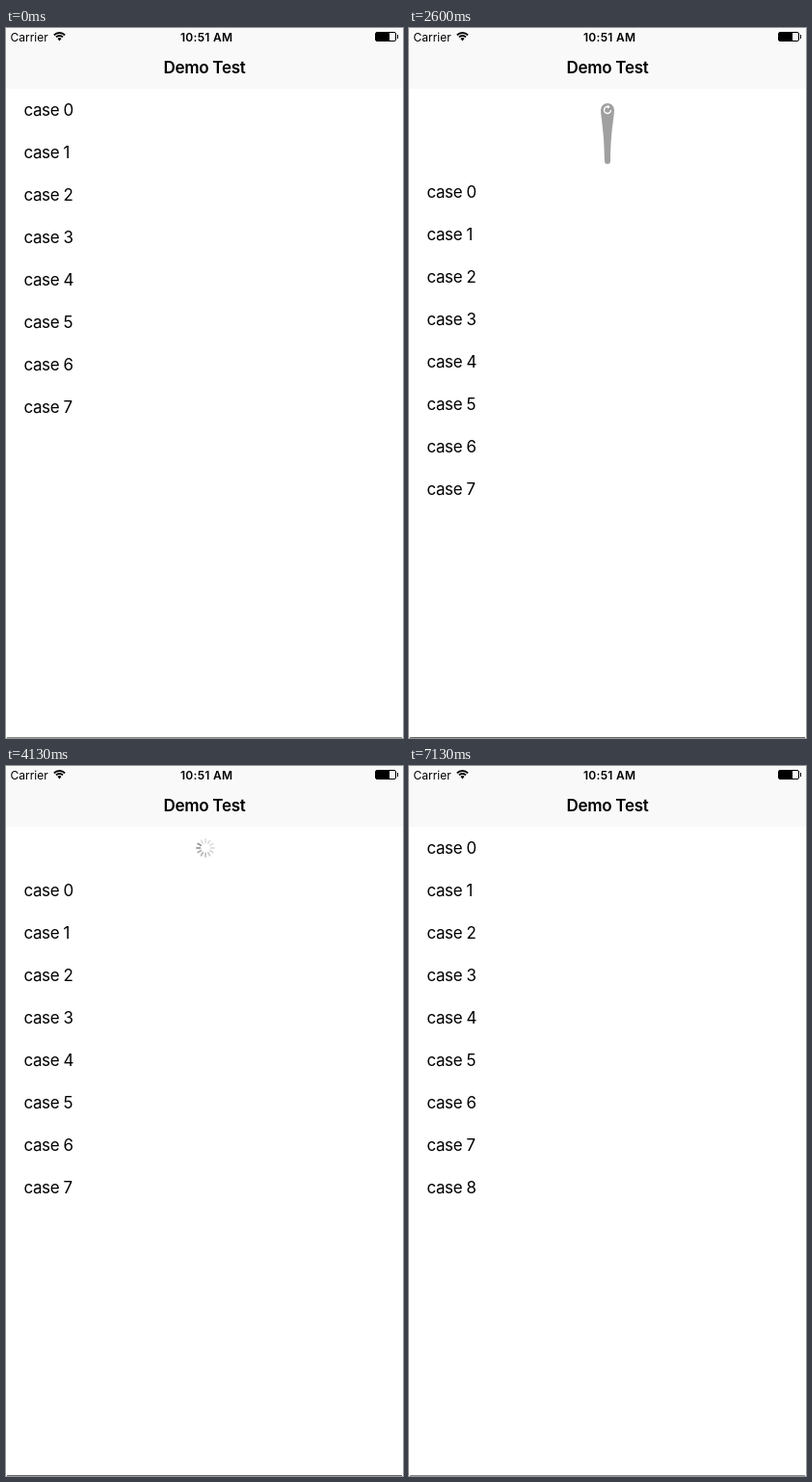
Animation of 412 by 736 pixels, one loop 7340 ms. Source, as an HTML page with a canvas:

```html
<!DOCTYPE html>
<html lang="en">
<head>
<meta charset="utf-8">
<title>Demo Test</title>
<style>
  html, body { margin: 0; width: 100%; height: 100%; overflow: hidden; background: #fff; }
  canvas { display: block; }
</style>
</head>
<body>
<canvas id="stage" width="412" height="736"></canvas>
<script>
const ctx = document.getElementById('stage').getContext('2d');
const LOOP = 7340, STEP = 1000 / 15, TAU = Math.PI * 2;
const BAR = 63, ROW = 44, CX = 206, GRAY = '#a0a0a0';
const TRIGGER = 2800, RELEASE = 3267, DONE = 4860, CLOSE = 5467;

// Time and list offset while the finger drags.
const DRAG = [[1133, 0], [1267, 5], [1467, 18.33], [1733, 37], [1933, 47], [2000, 47],
  [2333, 68], [2600, 85], [2733, 92], [2800, 92], [2867, 102], [3000, 124.33], [RELEASE, 128]];

const clamp = v => Math.max(0, Math.min(1, v));
const lerp = (a, b, p) => a + (b - a) * p;

function dragOffset(t) {
  const i = DRAG.findIndex(point => t <= point[0]);
  if (i < 1) return 0;
  const [t0, a] = DRAG[i - 1], [t1, b] = DRAG[i];
  return lerp(a, b, (t - t0) / (t1 - t0));
}

function offsetAt(t) {
  if (t <= RELEASE) return dragOffset(t);
  if (t <= CLOSE) {
    const u = 10.65 * (t - RELEASE) / 1000;
    return ROW + 84 * (1 + u) * Math.exp(-u);
  }
  return ROW * (1 + Math.cos(Math.PI * clamp((t - CLOSE) / 500))) / 2;
}

function rect(color, x, y, w, h) {
  ctx.fillStyle = color;
  ctx.fillRect(x, y, w, h);
}

function text(string, x, y, font, spacing = 0, color = '#000', align = 'left') {
  ctx.font = font;
  ctx.letterSpacing = spacing + 'px';
  ctx.fillStyle = color;
  ctx.textAlign = align;
  ctx.fillText(string, x, y);
}

function stroke(color, width, path) {
  ctx.strokeStyle = color;
  ctx.lineWidth = width;
  ctx.beginPath();
  path();
  ctx.stroke();
}

function drawPull(offset, t) {
  const gone = clamp((t - TRIGGER) / 133);
  if (offset <= 0 || gone === 1) return;
  const p = clamp((85 - offset) / 47), top = BAR + offset;
  const r = lerp(7, 15.5, p), tail = lerp(3, 15.5, p);
  const y = Math.min(top - 19, lerp(85, 82, p));
  const end = lerp(Math.max(y, top - lerp(7, 3.5, p) - tail), y, gone);
  const near = lerp(r, tail, 0.1), far = lerp(r, tail, 0.9);
  const nearY = lerp(y, end, 0.2), farY = lerp(y, end, 0.4);

  ctx.save();
  ctx.globalAlpha = 1 - gone;
  ctx.fillStyle = GRAY;
  ctx.beginPath();
  ctx.arc(CX, y, r, Math.PI, 0);
  ctx.bezierCurveTo(CX + near, nearY, CX + far, farY, CX + tail, end);
  ctx.arc(CX, end, tail, 0, Math.PI);
  ctx.bezierCurveTo(CX - far, farY, CX - near, nearY, CX - r, y);
  ctx.fill();

  // Reload arrow
  ctx.translate(CX, y);
  ctx.scale(r / 15.5, r / 15.5);
  stroke('#fff', 3, () => ctx.arc(0, 0, 7.7, 0, Math.PI * 1.5));
  ctx.fillStyle = '#fff';
  ctx.beginPath();
  ctx.moveTo(0, -11.5);
  ctx.lineTo(6, -7);
  ctx.lineTo(0, -3);
  ctx.fill();
  ctx.restore();
}

function drawSpinner(t) {
  const size = clamp((t - 3000) / 200);
  if (!size || t >= DONE) return;
  const head = Math.floor(t * 12 / 1000) + 9;
  ctx.save();
  ctx.translate(207, 85);
  ctx.scale(size, size);
  ctx.lineCap = 'round';
  for (let i = 0; i < 12; i++) {
    const age = (head - i) % 12, shade = Math.min(224, 150 + age * 11);
    const a = i * TAU / 12, x = Math.sin(a), y = -Math.cos(a);
    stroke(`rgb(${shade},${shade},${shade})`, 1.8, () => {
      ctx.moveTo(x * 5.5, y * 5.5);
      ctx.lineTo(x * 9, y * 9);
    });
  }
  ctx.restore();
}

function drawMessage(t) {
  if (t < DONE || t > 6000) return;
  ctx.save();
  ctx.globalAlpha = clamp((t - 4800) / 400) * (1 - clamp((t - CLOSE) / 400));
  stroke('#8c8c8c', 1.3, () => ctx.arc(160.5, 85, 9.4, 0, TAU));
  stroke('#8c8c8c', 2, () => {
    ctx.moveTo(156, 85);
    ctx.lineTo(159.3, 88.2);
    ctx.lineTo(165.5, 82);
  });
  text('刷新成功', 205, 90, '14px "Noto Sans CJK SC", "Noto Sans CJK", sans-serif', 0, '#aaa');
  ctx.restore();
}

function drawList(offset, t) {
  const thirds = Math.round(offset * 3), shift = Math.floor(thirds / 3);
  const count = t < DONE ? 8 : 9;
  rect('#fff', 0, BAR + shift, 412, 736);
  for (let i = 0; i < count; i++) {
    text('case ' + i, 18.6, 91 + shift + i * ROW, '17px Inter, sans-serif', -0.45);
  }
  // Hairlines are a third of a pixel high and show only at one subpixel phase.
  if (thirds % 3 !== 1) return;
  for (let y = 106 + shift; y < 735; y += ROW) rect('#c8c8ca', 19, y, 393, 1);
}

function drawBar() {
  rect('#f9f9f9', 0, 0, 412, BAR);
  text('Carrier', 4.5, 14, '12px Inter, sans-serif');
  text('10:51 AM', 208.2, 14, '600 12px Inter, sans-serif', 0.3, '#000', 'center');
  text('Demo Test', CX, 47, '600 17px Inter, sans-serif', -0.3, '#000', 'center');

  const from = Math.PI * 1.25, to = Math.PI * 1.75;
  for (const r of [8, 5]) stroke('#000', 1.8, () => ctx.arc(55.5, 13, r, from, to));
  ctx.fillStyle = '#000';
  ctx.beginPath();
  ctx.moveTo(55.5, 13.5);
  ctx.arc(55.5, 13, 2.8, from, to);
  ctx.fill();

  stroke('#000', 1, () => ctx.roundRect(383.5, 4.5, 21, 9, 1.5));
  rect('#000', 384, 5, 14, 8);
  rect('#000', 406, 7, 1, 4);
}

function draw(now) {
  const time = now % LOOP;
  const t = Math.floor((time + 4) / STEP) * STEP;
  const offset = offsetAt(t);
  rect('#fff', 0, 0, 412, 736);
  drawPull(offset, t);
  drawSpinner(t);
  drawMessage(t);
  drawList(offset, t);
  drawBar();
  rect(time >= 1000 && time < 7130 ? '#666' : '#888', 1, 735, 410, 1);
  requestAnimationFrame(draw);
}
requestAnimationFrame(draw);
</script>
</body>
</html>
```
